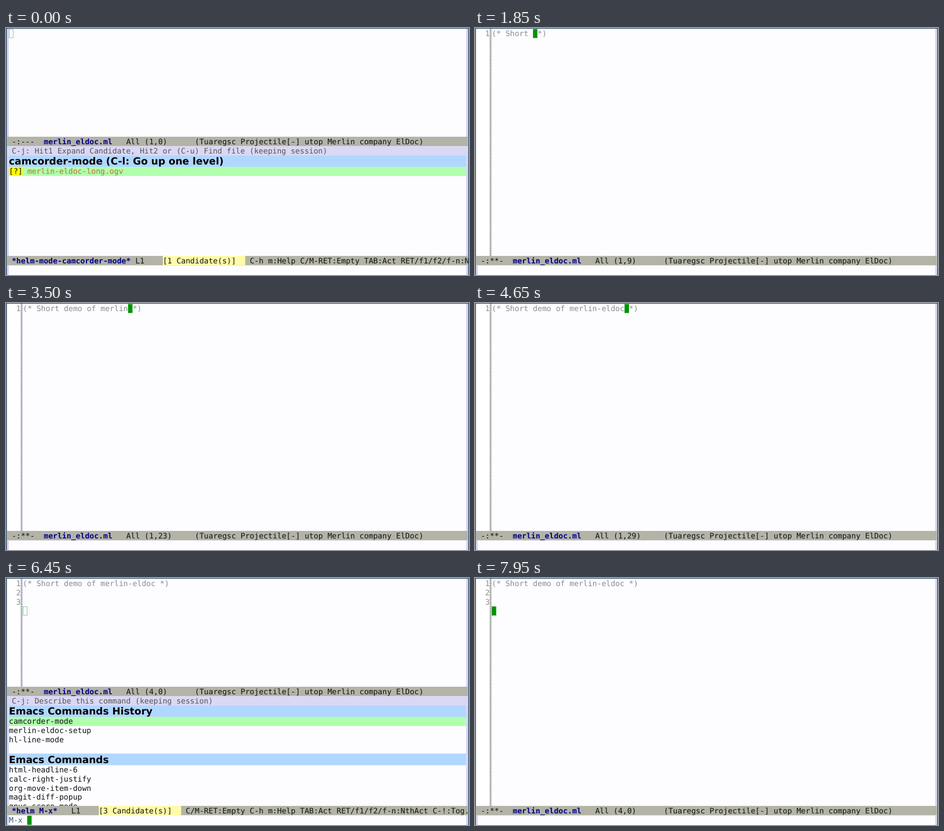
Write an HTML page that moves like this. It is 800 by 427 pixels and loops after 8 s.

```html
<!DOCTYPE html>
<html lang="en">
<head>
<meta charset="utf-8">
<title>merlin-eldoc demo</title>
<style>
  html, body { margin: 0; width: 100%; height: 100%; overflow: hidden; background: #fdfcff; }
  svg { display: block; width: 800px; height: 427px; }
  text {
    font: 13.14px "DejaVu Sans Mono", monospace;
    text-rendering: geometricPrecision;
    white-space: pre;
  }
  .bold { font-weight: bold; }
  .title { font: bold 17.05px "DejaVu Sans", sans-serif; }
</style>
</head>
<body>
<svg id="stage" viewBox="0 0 800 427" xmlns="http://www.w3.org/2000/svg"></svg>
<script>
const LOOP = 8000;
const CHAR = 7.91;
const ROW = 15.83;
const COLOR = {
  paper: '#fdfcff', frame: '#34506e', fringe: '#dad8f4', bar: '#b3b3a7',
  navy: '#00008b', comment: '#8b8b8b', cursor: '#009400', hollow: '#8fd08f',
  heading: '#b0d7ff', selected: '#b0ffad', badge: '#fffba8'
};
const PHRASE = 'Short demo of merlin-eldoc';
const MODES = '(Tuaregsc Projectile[-] utop Merlin company ElDoc)';

// Moment at which each character of PHRASE is typed.
const KEYS = [
  1350, 1450, 1550, 1650, 1750, 1850, 1950, 2050, 2150, 2200,
  2450, 2600, 2700, 2800, 2900, 3000, 3100, 3200, 3300, 3400,
  3700, 4000, 4150, 4300, 4400, 4550
];
const TIME = {
  fileOpened: 200, comment: 800, lineEnd: 5200, newlines: [5600, 5750, 5950],
  commandMenu: 6200, nextItem: 7450, menuClosed: 7850
};

const rect = (x, y, w, h, fill, extra = '') =>
  `<rect x="${x}" y="${y}" width="${w}" height="${h}" fill="${fill}" ${extra}/>`;
const text = (x, y, str, fill = '#111', cls = '') =>
  `<text x="${x}" y="${y}" fill="${fill}" class="${cls}" xml:space="preserve">${str}</text>`;
const countPast = (times, t) => times.filter(at => t >= at).length;
const barX = col => 2 + col * CHAR;

function stateAt(t) {
  const typed = countPast(KEYS, t);
  const line = countPast(TIME.newlines, t);
  const commented = t >= TIME.comment;
  let col = commented ? 3 + typed : 0;
  if (t >= TIME.lineEnd) col = line ? 0 : PHRASE.length + 6;
  let menu = 'none';
  if (t < TIME.fileOpened) menu = 'files';
  else if (t >= TIME.commandMenu && t < TIME.menuClosed) menu = 'commands';
  return { typed, line, col, commented, menu, pick: t >= TIME.nextItem ? 1 : 0 };
}

function cursor(x, y, filled) {
  return filled
    ? rect(x, y, 7.6, 15.6, COLOR.cursor)
    : rect(x + .5, y + .5, 6.9, 14.6, 'none', `stroke="${COLOR.hollow}"`);
}

function buffer(s, bottom) {
  const left = s.commented ? 29 : 5;
  let out = '';
  if (s.commented) {
    out += rect(2, 1, 23.5, bottom - 1, '#fff');
    out += rect(25.5, 1, 3.5, bottom - 1, COLOR.fringe);
    out += rect(25.5, 1, 2.5, bottom - 1, 'url(#dashes)');
    out += text(left, 14, `(* ${PHRASE.slice(0, s.typed)} *)`, COLOR.comment);
    for (let i = 0; i < Math.max(1, s.line); i++)
      out += text(17.5, 14 + i * ROW, i + 1, COLOR.comment);
  } else {
    out += rect(1.5, 1, 3.5, bottom - 1, COLOR.fringe);
  }
  return out + cursor(left + s.col * CHAR, 1.7 + s.line * ROW, s.menu === 'none');
}

function bufferBar(s, y) {
  const base = y + 12.5;
  return rect(2, y, 796, 16.3, COLOR.bar)
    + text(barX(1), base, s.commented ? '-:**-' : '-:---')
    + text(barX(8), base, 'merlin_eldoc.ml', COLOR.navy, 'bold')
    + text(barX(26), base, `All (${s.line + 1},${s.col})`)
    + text(barX(41), base, MODES);
}

function menuBar(name, lineCol, row, count, help) {
  const y = 394, base = 406.5, badgeCol = lineCol + 6;
  return rect(2, y, 796, 16.3, COLOR.bar)
    + text(barX(1), base, name, COLOR.navy, 'bold')
    + text(barX(lineCol), base, `L${row}`)
    + rect(barX(badgeCol), y, 18 * CHAR, 16.3, COLOR.badge)
    + text(barX(badgeCol), base, `[${count} Candidate(s)]`)
    + text(barX(badgeCol + 19), base, help);
}

const heading = (y, str) =>
  rect(5, y, 790, 20, COLOR.heading) + text(5, y + 16, str, '#000', 'title');
const hint = str =>
  rect(2, 204.3, 796, 16, COLOR.fringe) + text(barX(1), 216.6, str, '#555');
const selection = row => rect(5, 240 + row * ROW, 790, ROW, COLOR.selected);
const items = (y, list) =>
  list.map((name, i) => text(5, y + 12.4 + i * ROW, name)).join('');

function fileMenu() {
  return hint('C-j: Hit1 Expand Candidate, Hit2 or (C-u) Find file (keeping session)')
    + heading(220.2, 'camcorder-mode (C-l: Go up one level)')
    + selection(0)
    + rect(5, 240, 3 * CHAR, ROW, '#ffff00')
    + text(5, 252.4, '[?]')
    + text(5 + 4 * CHAR, 252.4, 'merlin-eldoc-long.ogv', '#b8742c')
    + menuBar('*helm-mode-camcorder-mode*', 28, 1, 1,
      'C-h m:Help C/M-RET:Empty TAB:Act RET/f1/f2/f-n:NthAct');
}

function commandMenu(pick) {
  return hint('C-j: Describe this command (keeping session)')
    + heading(220.2, 'Emacs Commands History')
    + selection(pick)
    + items(240, ['camcorder-mode', 'merlin-eldoc-setup', 'hl-line-mode'])
    + heading(303.5, 'Emacs Commands')
    + items(323.5, ['html-headline-6', 'calc-right-justify', 'org-move-item-down',
      'magit-diff-popup', 'gnus-score-mode'])
    + menuBar('*helm M-x*', 14, pick + 1, 3,
      'C/M-RET:Empty C-h m:Help TAB:Act RET/f1/f2/f-n:NthAct C-!:Tog.')
    + rect(2, 410.3, 796, 17, COLOR.paper)
    + text(5, 423, 'M-x', '#36597f')
    + cursor(5 + 4 * CHAR, 411, true);
}

function scene(s) {
  const open = s.menu !== 'none';
  const barY = open ? 188 : 394;
  let out = `<defs><pattern id="dashes" width="3" height="4" patternUnits="userSpaceOnUse">
    ${rect(0, 0, 3, 4, '#c9c8cc')}${rect(0, 0, 3, 2.6, '#a9a9a6')}</pattern></defs>`;
  out += rect(0, 0, 800, 427, COLOR.paper);
  out += buffer(s, barY) + bufferBar(s, barY);
  if (s.menu === 'files') out += fileMenu();
  if (s.menu === 'commands') out += commandMenu(s.pick);
  if (open) out += rect(1.5, 220.2, 3.5, 173.8, COLOR.fringe);
  out += rect(1.5, 410.3, 3.5, 17, COLOR.fringe);
  const gaps = open ? [[1, 187], [220.2, 173.8], [410.3, 17]] : [[1, 393], [410.3, 17]];
  for (const [y, h] of gaps) out += rect(795, y, 3.6, h, COLOR.fringe);
  return out + rect(0, 0, 800, 1.2, COLOR.frame)
    + rect(0, 0, 1.5, 427, COLOR.frame) + rect(798.6, 0, 1.4, 427, COLOR.frame);
}

const stage = document.getElementById('stage');
const start = performance.now();
let shown = '';
function tick() {
  const state = stateAt((performance.now() - start) % LOOP);
  const key = JSON.stringify(state);
  if (key !== shown) {
    stage.innerHTML = scene(state);
    shown = key;
  }
  requestAnimationFrame(tick);
}
tick();
</script>
</body>
</html>
```
